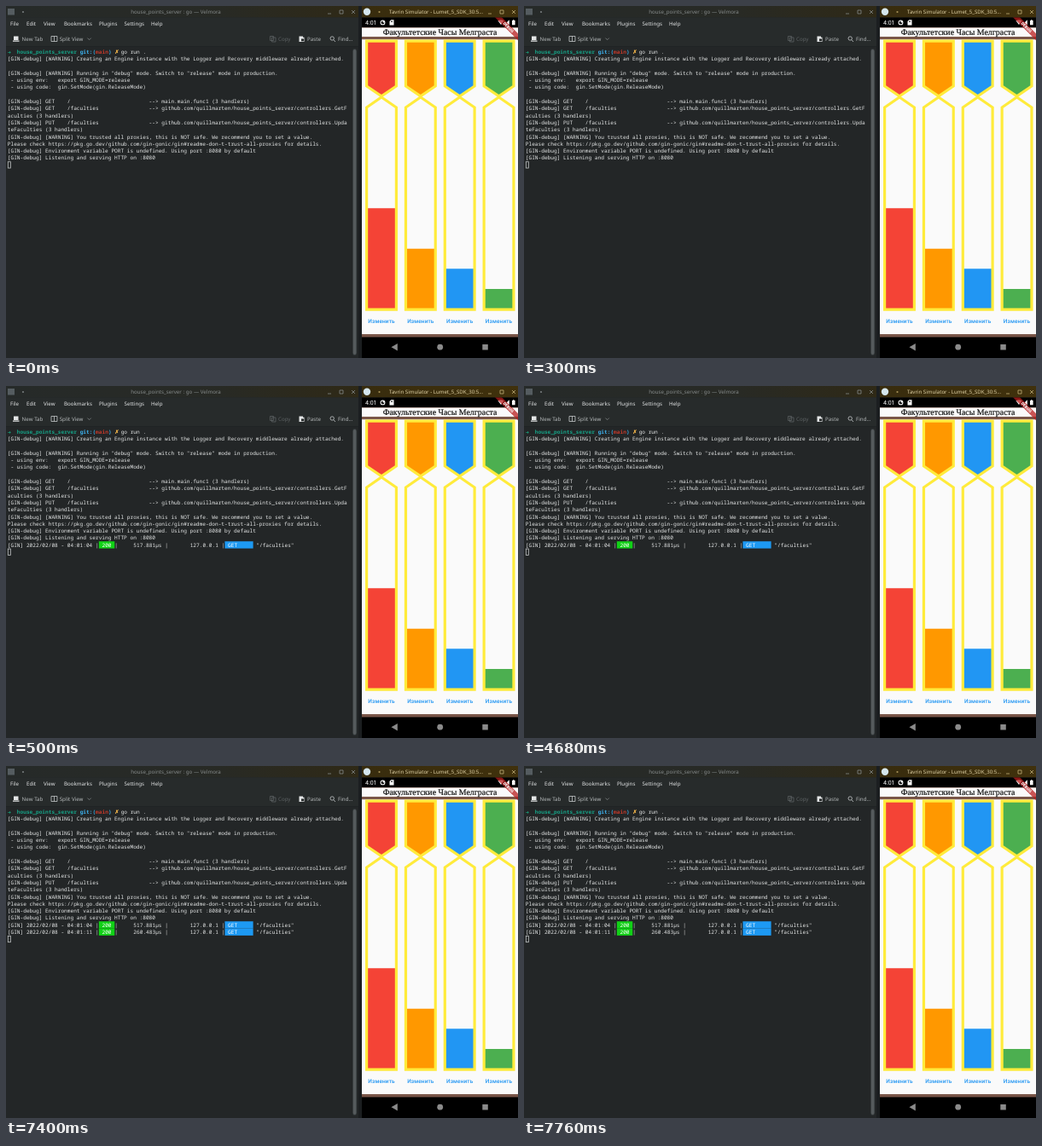
Write an HTML page that moves like this. It is 600 px wide and 413 px high and loops after 8000 ms.

```html
<!DOCTYPE html>
<html lang="en">
<head>
<meta charset="utf-8">
<title>House points</title>
<style>
  html, body { margin: 0; width: 100%; height: 100%; overflow: hidden; background: #232627; }
  svg { display: block; width: 600px; height: 413px; }
  text { white-space: pre; text-rendering: geometricPrecision; font: 6.2px "Noto Sans", sans-serif; fill: #e3e5e6; }
  .mono text { font: 6.15px "Noto Sans Mono", monospace; fill: #e4e6e6; }
  .mid { text-anchor: middle; }
  .line { fill: none; stroke: #c5c8c9; stroke-width: .8; }
</style>
</head>
<body>
<svg id="stage" viewBox="0 0 600 413">
  <defs>
    <linearGradient id="bar">
      <stop offset="0" stop-color="#262a29"/>
      <stop offset=".6" stop-color="#282a25"/>
      <stop offset="1" stop-color="#2f2916"/>
    </linearGradient>
    <linearGradient id="bar2">
      <stop offset="0" stop-color="#382c0e"/>
      <stop offset="1" stop-color="#40310c"/>
    </linearGradient>
    <clipPath id="phone"><path d="M417 13.5H600V388H417z"/></clipPath>
  </defs>

  <!-- terminal window -->
  <path fill="#232627" d="M0 0H600V413H0z"/>
  <path fill="url(#bar)" d="M0 0H414V13.5H0z"/>
  <path fill="#272b2b" d="M0 13.5H413V47.5H0z"/>
  <path fill="#1b1e20" d="M0 47H413V47.6H0zM413 0H417V413H413z"/>
  <path fill="#555c60" d="M2 3H10V10.5H2z"/>
  <circle cx="20" cy="7" r="1.1" fill="#777c7d"/>
  <text class="mid" x="199" y="9.2" style="fill:#858a8a">house_points_server : go — Velmora</text>
  <g id="menu"></g>
  <g class="line">
    <path d="M53 35.5H60V41.5H53zM56.5 35.5V41.5"/>
    <path stroke="#85898b" d="M95.5 37.6L97.6 39.7L99.7 37.6"/>
    <path stroke="#5c6163" d="M309.5 35.5H313.5V40.5H309.5zM311.5 37H316V42H311.5z"/>
    <circle cx="382.2" cy="38" r="2.2"/><path d="M383.8 39.6L386 42"/>
  </g>
  <path fill="#e3e5e6" d="M9 35.5H14.5V40H9zM8 40.5H15.5V41.7H8zM343.5 35.5H348V36.8H349.5V42H343.5z"/>
  <path fill="#272b2b" d="M346 38.5H349V41.3H346z"/>
  <rect x="406.3" y="50" width="4.6" height="360" rx="2.3" fill="#33383a"/>
  <rect x="406.7" y="51" width="3.8" height="358" rx="1.9" fill="#555a5c"/>
  <g id="term" class="mono"></g>
  <rect id="cursor" class="line" x="2.3" width="3" height="7.3"/>

  <!-- phone window -->
  <path fill="url(#bar2)" d="M417 0H600V13.5H417z"/>
  <circle cx="423" cy="6.7" r="4.2" fill="#d5e6ed"/>
  <circle cx="437.5" cy="7" r="1.1" fill="#a8925a"/>
  <text x="449" y="9" style="font-size:6.1px;fill:#ded0a4">Tavrin Simulator - Lumet_5_SDK_30:5…</text>
  <g id="buttons" class="line"></g>
  <path d="M417 13.5H600V413H417z"/>
  <path fill="#795548" d="M417 25H600V388.4H417z"/>
  <path fill="#fafafa" d="M417 25.5H600V36H417zM417 39.3H600V385H417z"/>
  <text x="421" y="22" style="font:7px Roboto,sans-serif;fill:#fff">4:01</text>
  <g fill="#fff">
    <circle cx="441.5" cy="19.4" r="2.9"/>
    <path d="M451.2 16.3H454.5V22.4H449.5V18.1zM576.5 17.3Q580 15 583.5 17.3L580 22.1zM589.8 16.3V22.1H584zM593 17H594V16.2H595.6V17H596.6V22.3H593z"/>
    <path fill="#000" d="M441.5 19.4V17.5A1.9 1.9 0 1 0 443.4 19.4zM451 17.6H451.7V19H451zM452.4 17.6H453.1V19H452.4z"/>
  </g>
  <text class="mid" x="508.5" y="33.6" style="font:9.9px 'Liberation Serif',serif;fill:#111;stroke:#111;stroke-width:.2">Факультетские Часы Мелграста</text>
  <g id="glasses"></g>
  <g clip-path="url(#phone)">
    <g transform="translate(600 13.8) rotate(45)">
      <path fill="#b71c1c" fill-opacity=".75" d="M-20 13H20V18.7H-20z"/>
      <text class="mid" y="17.5" style="font:900 4.7px Roboto,sans-serif;fill:#fff">DEBUG</text>
    </g>
  </g>
  <g fill="#8b8b8b">
    <path d="M451.5 400.2L458.8 396V404.4z"/>
    <circle cx="508.7" cy="400.2" r="3.4"/>
    <path d="M558.3 397H564.8V403.5H558.3z"/>
  </g>
</svg>
<script>
const $ = id => document.getElementById(id);
const LEFT = 1.8, TOP = 49.3, CELL = 3.69, ROW = 8.31;

function add(parent, tag, attrs, text = "") {
  const el = document.createElementNS("http://www.w3.org/2000/svg", tag);
  for (const key in attrs) el.setAttribute(key, attrs[key]);
  el.textContent = text;
  return parent.appendChild(el);
}

// Writes text on the terminal grid, optionally on a coloured block.
function put(parent, row, col, text, style = "", block) {
  const x = LEFT + col * CELL, y = TOP + row * ROW;
  if (block) add(parent, "rect", { x, y, width: text.length * CELL, height: ROW, fill: block });
  add(parent, "text", { x, y: y + 6.5, style }, text);
}

const bright = "#e3e5e6", soft = "#b5b9ba", faint = "#5c6163";
for (const [x, y, text, fill = bright] of [
  [5, 22.8, "File"], [24, 22.8, "Edit"], [44, 22.8, "View"], [68, 22.8, "Bookmarks"],
  [109, 22.8, "Plugins"], [138.5, 22.8, "Settings"], [170, 22.8, "Help"],
  [18.6, 40.8, "New Tab", soft], [62.7, 40.8, "Split View", soft], [319, 40.8, "Copy", faint],
  [353, 40.8, "Paste", soft], [389, 40.8, "Find...", soft]
]) add($("menu"), "text", { x, y, style: `fill:${fill}` }, text);

for (const [x, stroke] of [[379, "#858a8a"], [567, "#bfae78"]])
  add($("buttons"), "path", {
    stroke,
    d: `M${x - 2} 9H${x + 2}M${x + 12} 5H${x + 16}V9H${x + 12}zM${x + 26} 5L${x + 30} 9M${x + 30} 5L${x + 26} 9`
  });

const term = $("term");
for (const [col, text, fill, weight] of [
  [0, "➜", "#17b087;font-size:5px", 400], [3, "house_points_server", "#16a085", 700],
  [23, "git:(", "#3daee9", 700], [28, "main", "#c0392b", 700], [32, ")", "#3daee9", 700],
  [34, "✗", "#fdbc4b", 700], [36, "go run .", "#e4e6e6", 400]
]) put(term, 0, col, text, `fill:${fill};font-weight:${weight}`);

const gin = "[GIN-debug] ", repo = "github.com/quillmarten/house_points_server/controllers.";
const route = (verb, path, handler) => gin + verb.padEnd(7) + path.padEnd(26) + "--> " + handler;
[
  gin + "[WARNING] Creating an Engine instance with the Logger and Recovery middleware already attached.",
  "",
  gin + '[WARNING] Running in "debug" mode. Switch to "release" mode in production.',
  " - using env:   export GIN_MODE=release",
  " - using code:  gin.SetMode(gin.ReleaseMode)",
  "",
  route("GET", "/", "main.main.func1 (3 handlers)"),
  route("GET", "/faculties", repo + "GetF"),
  "aculties (3 handlers)",
  route("PUT", "/faculties", repo + "Upda"),
  "teFaculties (3 handlers)",
  gin + "[WARNING] You trusted all proxies, this is NOT safe. We recommend you to set a value.",
  "Please check https://pkg.go.dev/github.com/gin-gonic/gin#readme-don-t-trust-all-proxies for details.",
  gin + "Environment variable PORT is undefined. Using port :8080 by default",
  gin + "Listening and serving HTTP on :8080"
].forEach((text, i) => put(term, i + 1, 0, text));

const requests = [
  { at: 500, clock: "04:01:04", took: "517.881µs" },
  { at: 7400, clock: "04:01:11", took: "260.483µs" }
];
requests.forEach((req, i) => {
  const row = 16 + i, g = req.el = add(term, "g", {});
  put(g, row, 0, `[GIN] 2022/02/08 - ${req.clock} |`);
  put(g, row, 29, " 200 ", "fill:#fff", "#11d116");
  put(g, row, 34, `| ${req.took.padStart(13)} | ${"127.0.0.1".padStart(15)} |`);
  put(g, row, 69, " GET     ", "fill:#fff", "#1d99f3");
  put(g, row, 79, '"/faculties"');
});

// Hourglasses: colour and height of the sand surface.
[["#f44336", 237.2], ["#ff9800", 284.7], ["#2196f3", 308.3], ["#4caf50", 332]].forEach(([fill, level], i) => {
  const x = 440 + i * 45.85, l = x - 17.4, r = x + 17.4, g = $("glasses");
  const frame = { stroke: "#ffeb3b", "stroke-width": 3.2 };
  add(g, "path", { ...frame, fill, d: `M${l} 41.2H${r}V94L${x} 105.8L${l} 94z` });
  add(g, "path", { fill, d: `M${l} ${level}H${r}V355.5H${l}z` });
  add(g, "path", { ...frame, fill: "none", d: `M${x} 107L${r} 119V356.1H${l}V119z` });
  add(g, "text", { class: "mid", x, y: 371.8, style: "font:500 6.5px Roboto,sans-serif;letter-spacing:.1px;fill:#2196f3" }, "Изменить");
});

function draw() {
  const t = performance.now() % 8000;
  let row = 16;
  for (const req of requests) {
    const shown = t >= req.at;
    req.el.setAttribute("visibility", shown ? "visible" : "hidden");
    row += shown;
  }
  $("cursor").setAttribute("y", TOP + row * ROW + .5);
  requestAnimationFrame(draw);
}
draw();
</script>
</body>
</html>
```
